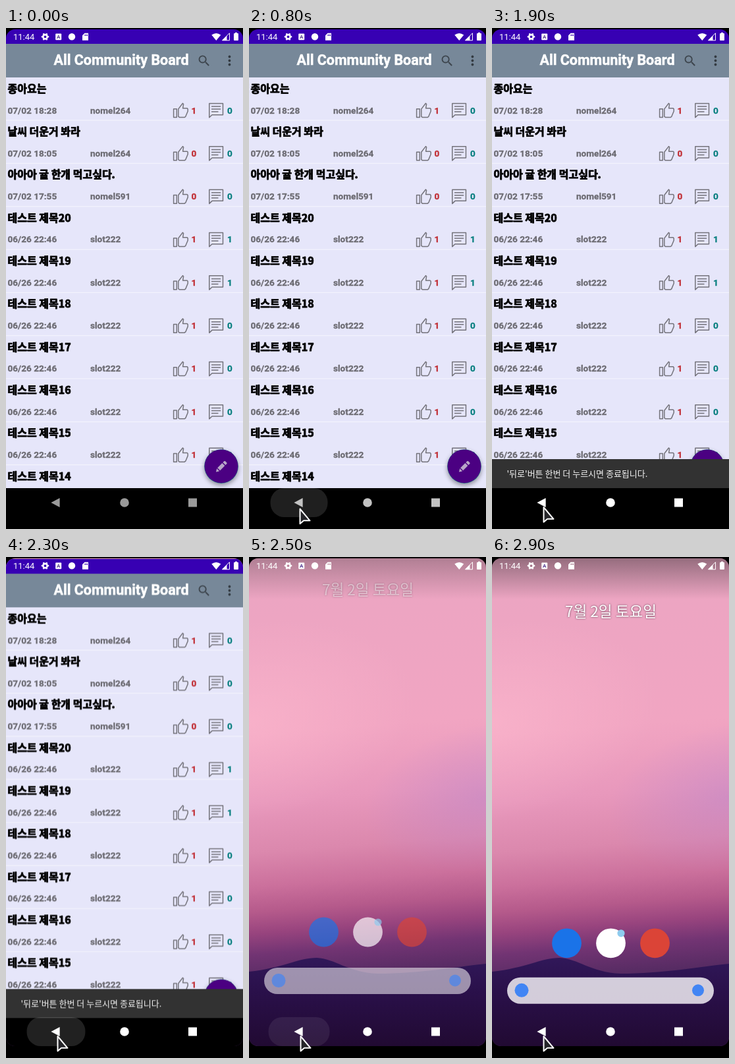
Animation of 360x760 px, one loop 3000 ms. Source, as an HTML page with a canvas:

```html
<!DOCTYPE html>
<html lang="ko">
<head>
<meta charset="utf-8">
<title>Community board</title>
<style>
html, body { margin: 0; width: 100%; height: 100%; overflow: hidden; background: #000; }
canvas { display: block; width: 360px; height: 760px; }
</style>
</head>
<body>
<canvas id="stage" width="360" height="760"></canvas>
<script>
const W = 360, H = 760, LOOP = 3000, STEP = 100;
const TOP = 2, BOTTOM = 742, NAV_TOP = 698, ROW_H = 65.33;
const LATIN = 'Roboto, "Noto Sans", sans-serif';
const KOREAN = '"Noto Sans CJK KR", "Noto Sans KR", "Noto Sans CJK", sans-serif';

const stage = document.getElementById('stage').getContext('2d');
const appLayer = document.createElement('canvas');
appLayer.width = W;
appLayer.height = H;
const app = appLayer.getContext('2d');

const clamp = v => Math.max(0, Math.min(1, v));
const lerp = (a, b, k) => a + (b - a) * k;
const ramp = (t, from, to) => clamp((t - from) / (to - from));
const easeOut = k => 1 - (1 - k) ** 3;

function rect(c, x, y, w, h, color) {
  c.fillStyle = color;
  c.fillRect(x, y, w, h);
}

function pill(c, x, y, w, h, r, color) {
  c.fillStyle = color;
  c.beginPath();
  c.roundRect(x, y, w, h, r);
  c.fill();
}

function disc(c, x, y, r, color) {
  c.fillStyle = color;
  c.beginPath();
  c.arc(x, y, r, 0, Math.PI * 2);
  c.fill();
}

// `heavy` thickens the letters by an outline of that width
function text(c, str, x, y, font, color, heavy = 0) {
  c.font = font;
  c.fillStyle = c.strokeStyle = color;
  c.fillText(str, x, y);
  if (heavy) {
    c.lineWidth = heavy;
    c.lineJoin = 'round';
    c.strokeText(str, x, y);
  }
}

// Fills or strokes an SVG path placed at x, y
function shape(c, d, x, y, { fill, stroke, width = 1.5, scale = 1 }) {
  const path = new Path2D(d);
  c.save();
  c.translate(x, y);
  c.scale(scale, scale);
  c.lineJoin = 'round';
  if (fill) { c.fillStyle = fill; c.fill(path, 'evenodd'); }
  if (stroke) { c.strokeStyle = stroke; c.lineWidth = width; c.stroke(path); }
  c.restore();
}

const THUMB = 'M.8 9.5h4.7v12.7H.8zM8 9.6l6.6-8.6 1.2 1.2-1 6.3h6.6l1 1.2v3.2L19 21l-1.5 1.2H9.5L8 20.8z';
const COMMENT = 'M.8 .8H21.5V18H5L.8 22zM4 5.4H18.2M4 9.4H18.2M4 13.4H14.5';
const SEARCH = 'M15.5 14h-.79l-.28-.27A6.47 6.47 0 0 0 16 9.5 6.5 6.5 0 1 0 9.5 16c1.61 0 3.09-.59 4.23-1.57l.27.28v.79l5 4.99L20.49 19zM9.5 14a4.5 4.5 0 1 1 0-9 4.5 4.5 0 0 1 0 9z';
const PENCIL = 'M0 17l1.2-5.2 4 4zM2.2 10.8l7.2-7.2 4 4-7.2 7.2zM10.4 2.6l1.8-1.8q1-1 2 0l2 2q1 1 0 2l-1.8 1.8z';
const ARROW = 'M0 0V22.5L5.6 17.8H15z';

const posts = [
  ['종아요는', '07/02 18:28', 'nomel264', 1, 0],
  ['날씨 더운거 봐라', '07/02 18:05', 'nomel264', 0, 0],
  ['아아아 귤 한개 먹고싶다.', '07/02 17:55', 'nomel591', 0, 0]
];
for (let n = 20; n >= 14; n--) {
  posts.push([`테스트 제목${n}`, '06/26 22:46', 'slot222', 1, n > 18 ? 1 : 0]);
}

function drawPost([title, date, author, likes, replies], i) {
  const y = 75 + i * ROW_H;
  const meta = (str, x, color) => text(app, str, x, y + 54.5, `bold 13.6px ${LATIN}`, color, 0.3);
  text(app, title, 2.5, y + 22.8, `900 16px ${KOREAN}`, '#000', 0.8);
  meta(date, 2.5, '#6c6b72');
  meta(author, 128, '#6c6b72');
  shape(app, THUMB, 253.8, y + 38.3, { stroke: '#74737b' });
  meta(likes, 281.5, '#c12f35');
  shape(app, COMMENT, 308, y + 38.7, { stroke: '#74737b' });
  meta(replies, 336, '#087f7f');
  rect(app, 0, y + ROW_H - 0.8, W, 1, '#f6f6fd');
}

function drawFab() {
  app.save();
  app.shadowColor = 'rgba(0,0,0,.4)';
  app.shadowBlur = 7;
  app.shadowOffsetY = 3;
  disc(app, 327, 665, 25.8, '#17808a');
  app.restore();
  disc(app, 327, 664.8, 25.4, '#4b0082');
  shape(app, PENCIL, 319, 656.5, { fill: '#b8a6c8' });
}

function drawApp(t) {
  rect(app, 0, 0, W, H, '#e6e6fa');
  posts.forEach(drawPost);
  rect(app, 0, 0, W, 24, '#3700b3');
  rect(app, 0, 24, W, 51, '#778899');
  text(app, 'All Community Board', 72.5, 56, `bold 21.5px ${LATIN}`, '#fff', 0.5);
  shape(app, SEARCH, 289.8, 38.6, { fill: '#3d454d', scale: 0.93 });
  for (const y of [43.5, 49.5, 55.5]) disc(app, 339.5, y, 1.9, '#343b42');
  drawFab();

  const rise = easeOut(ramp(t, 860, 1100));
  if (rise > 0) {
    const y = NAV_TOP - 44 * rise;
    rect(app, 0, y, W, 44, '#323232');
    text(app, "'뒤로'버튼 한번 더 누르시면 종료됩니다.", 22.5, y + 27, `13px ${KOREAN}`, '#f2f2f2');
  }
  rect(app, 0, NAV_TOP, W, H - NAV_TOP, '#000');
}

// Soft oval spot, wider than it is tall
function glow(x, y, r, rgb, alpha) {
  const g = stage.createRadialGradient(0, 0, 0, 0, 0, r);
  g.addColorStop(0, `rgba(${rgb},${alpha})`);
  g.addColorStop(1, `rgba(${rgb},0)`);
  stage.save();
  stage.translate(x, y);
  stage.rotate(-0.2);
  stage.scale(1.7, 1);
  rect(stage, -r, -r, 2 * r, 2 * r, g);
  stage.restore();
}

// Gradient over y0..y1 whose bands rise to the right with `tilt`
function vertical(y0, y1, stops, tilt = 0) {
  const g = stage.createLinearGradient(W / 2 - tilt, y0, W / 2 + tilt, y1);
  stops.forEach(([at, color]) => g.addColorStop(at, color));
  return g;
}

function drawWallpaper(shade) {
  rect(stage, 0, 0, W, H, vertical(0, 640, [
    [0, '#eba5c2'], [0.4, '#f1a5c2'], [0.56, '#e898bc'], [0.68, '#db88ad'],
    [0.76, '#cb709c'], [0.82, '#b55a8b'], [0.87, '#98447e'], [0.92, '#723473'], [1, '#50295f']
  ], 24));
  glow(0, 250, 150, '255,188,208', 0.5);
  glow(360, 365, 110, '192,136,202', 0.55);
  stage.fillStyle = vertical(605, BOTTOM, [[0, '#31185a'], [0.4, '#2a104a'], [1, '#210a32']]);
  stage.beginPath();
  stage.moveTo(0, 629);
  stage.bezierCurveTo(50, 624, 75, 608, 103, 608);
  stage.bezierCurveTo(130, 609, 150, 630, 195, 632);
  stage.bezierCurveTo(260, 632, 310, 622, W, 617);
  stage.lineTo(W, H);
  stage.lineTo(0, H);
  stage.fill();
  rect(stage, 0, 0, W, 64, vertical(0, 64, [[0, `rgba(60,50,55,${0.5 * shade})`], [1, 'rgba(60,50,55,0)']]));
}

function drawHome(t) {
  const shown = t < 2450 ? 0.07 : lerp(0.68, 1, ramp(t, 2500, 2650));
  const lag = Math.exp(-(t - 2500) / 88);
  drawWallpaper(shown);
  stage.save();

  stage.globalAlpha = t < 2450 ? 0 : lerp(0.5, 1, ramp(t, 2500, 2700));
  stage.textAlign = 'center';
  stage.shadowColor = 'rgba(60,30,50,.8)';
  stage.shadowBlur = 3;
  text(stage, '7월 2일 토요일', 180.5, 91 - 33 * lag, `22.6px ${KOREAN}`, '#fff');
  stage.shadowColor = 'transparent';

  stage.globalAlpha = shown;
  const iconY = 586 - 17 * lag;
  disc(stage, 113.5, iconY, 22.4, '#1a73e8');
  disc(stage, 180.5, iconY, 22.4, '#fff');
  disc(stage, 196, iconY - 15, 5.6, '#8ecbee');
  disc(stage, 247.5, iconY, 22.4, '#db4437');

  const barY = 638 - 15 * lag;
  pill(stage, 23, barY, 314, 40, 20, 'rgba(230,226,234,.9)');
  disc(stage, 45, barY + 19.5, 10.5, '#4285f4');
  disc(stage, 313, barY + 19.5, 9, '#4285f4');
  stage.restore();
}

function drawStatus() {
  const white = '#fff';
  text(stage, '11:44', 11, 18, `13px ${LATIN}`, white);

  stage.strokeStyle = white;
  stage.lineWidth = 2.6;
  stage.beginPath();
  stage.arc(59.5, 13.3, 3.2, 0, Math.PI * 2);
  stage.stroke();
  for (let i = 0; i < 6; i++) {
    const a = i * Math.PI / 3;
    disc(stage, 59.5 + 4.5 * Math.cos(a), 13.3 + 4.5 * Math.sin(a), 1.3, white);
  }

  pill(stage, 75.2, 8.6, 9, 9.6, 1, white);
  text(stage, 'A', 77, 16.4, `bold 8px ${LATIN}`, '#553a92');
  disc(stage, 100, 13.3, 5.2, white);
  shape(stage, 'M3.5 0H9V11H0V3.5zM3.4 2v2.2h1V2zM5.2 2v2.2h1V2zM7 2v2.2h1V2z', 116, 7.8, { fill: white });
  shape(stage, 'M0 2.6Q7 -2.6 14 2.6L7 11z', 312.3, 8, { fill: white });
  shape(stage, 'M11 0V11H0z', 328.5, 7.8, { stroke: white, width: 1 });
  shape(stage, 'M7 4V11H0z', 328.5, 7.8, { fill: white });
  pill(stage, 346, 8, 7, 11, 1, white);
  rect(stage, 348, 6.8, 3, 2, white);
}

function drawRipple(t, press, release, peak) {
  const alpha = peak * ramp(t, press - 40, press + 60) * (1 - ramp(t, release, release + 280));
  if (alpha <= 0) return;
  const half = lerp(37, 46.5, easeOut(ramp(t, press, press + 250)));
  pill(stage, 76 - half, NAV_TOP, half * 2, 44, 21, `rgba(255,250,255,${alpha})`);
}

function drawNav(t) {
  drawRipple(t, 720, 920, 0.12);
  drawRipple(t, 2200, 2380, 0.13);
  const v = Math.round(lerp(154, 255, ramp(t, 700, 950)));
  const color = `rgb(${v},${v},${v})`;
  shape(stage, 'M0 7L13.2 0V14z', 68.4, 713, { fill: color });
  disc(stage, 180, 720, 6.8, color);
  rect(stage, 277, 713.5, 13, 13, color);
}

function drawCursor(t) {
  if (t < 100) return;
  const enter = easeOut(ramp(t, 50, 500));
  const nudge = ramp(t, 800, 1100);
  const x = lerp(112, 77.5, enter) + nudge;
  const y = lerp(764, 729.5, enter) - 2.5 * nudge;
  shape(stage, ARROW, x, y, { fill: '#26262a', stroke: '#fff', width: 2 });
}

function draw(t) {
  rect(stage, 0, 0, W, H, '#000');
  stage.save();
  stage.beginPath();
  stage.roundRect(0, TOP, W, BOTTOM - TOP, 14);
  stage.clip();
  if (t >= 2300) drawHome(t);
  if (t < 2500) {
    drawApp(t);
    const drop = 48 * ramp(t, 2280, 2400) ** 2;
    stage.globalAlpha = 1 - 0.11 * ramp(t, 2300, 2400);
    stage.drawImage(appLayer, 0, TOP, W, H - TOP, 0, TOP + drop, W, H - TOP);
    stage.globalAlpha = 1;
  }
  drawStatus();
  drawNav(t);
  stage.restore();
  drawCursor(t);
}

const start = performance.now();
function tick() {
  const t = (performance.now() - start) % LOOP;
  draw(Math.floor(t / STEP) * STEP);
  requestAnimationFrame(tick);
}
tick();
</script>
</body>
</html>
```
